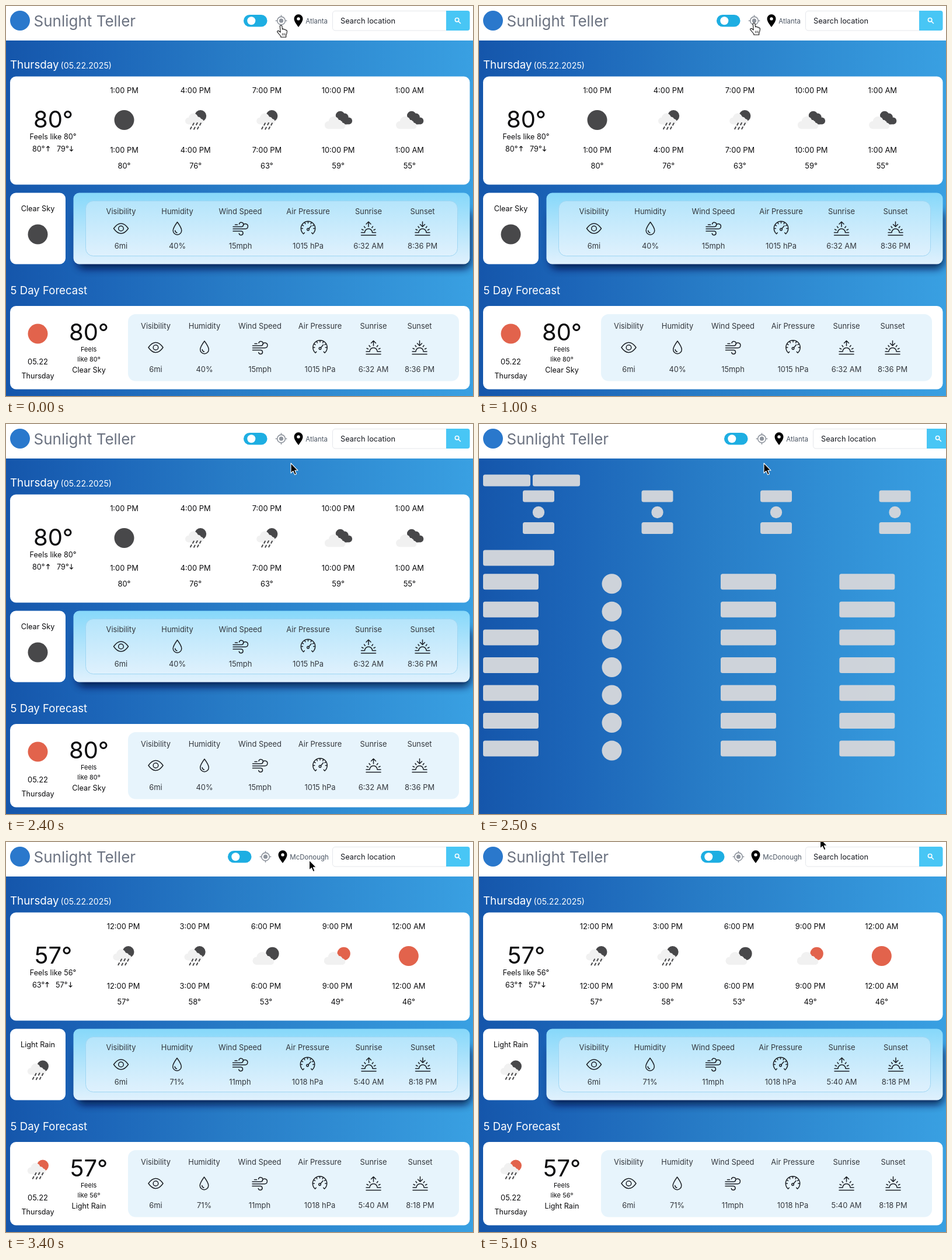
An HTML page that plays this animation: 800x667 px, repeating every 5200 ms.

```html
<!DOCTYPE html>
<html lang="en">
<head>
<meta charset="utf-8">
<title>Weather</title>
<style>
html, body { margin: 0; width: 100%; height: 100%; overflow: hidden; background: #fff; }
svg { display: block; width: 800px; height: 667px; font-family: Inter, Lato, sans-serif; }
</style>
</head>
<body>
<svg id="stage" viewBox="0 0 800 667" xmlns="http://www.w3.org/2000/svg"></svg>
<script>
const LOOP = 5200, STEP = 100, LOAD = 2500, READY = 3200, PULSE = 2400;
const DARK = '#48484a', SUN = '#e2634c', PALE = '#f1f1f1', INK = '#0b0b0d', SOFT = '#33373d';

const text = (x, y, s, size = 12.9, fill = INK, anchor = 'middle') =>
  `<text x="${x}" y="${y}" font-size="${size}" fill="${fill}" text-anchor="${anchor}">${s}</text>`;
const rect = (x, y, w, h, r, fill, more = '') =>
  `<rect x="${x}" y="${y}" width="${w}" height="${h}" rx="${r}" fill="${fill}" ${more}/>`;
const disc = (x, y, r, fill) => `<circle cx="${x}" cy="${y}" r="${r}" fill="${fill}"/>`;
const at = (x, y, body, more = '') => `<g transform="translate(${x} ${y})" ${more}>${body}</g>`;
const line = d => `<path d="${d}"/>`;

// Weather pictures, each centred on 0,0
const cloud = (x, y, s) => at(x, y,
  `<g transform="scale(${s})">` + disc(-11, 4, 6.5, PALE) + disc(-2, -1.5, 9, PALE) +
  disc(7, 2, 6, PALE) + disc(12, 5.2, 5.3, PALE) + rect(-12, 0, 24, 10.5, 2, PALE) + '</g>');
const drops = [[-4, 7], [2, 6.5], [8, 7], [-8, 13.5], [-2, 14], [4, 13.5]]
  .map(([x, y]) => `M${x + 1} ${y - 1.5}l-1.7 3.2`).join('');
const sky = {
  clear: c => disc(0, 0, 17, c),
  rain: c => disc(8.5, -7, 10, c) + cloud(-2, -2, .9) +
    `<path d="${drops}" stroke="${DARK}" stroke-width="2" stroke-linecap="round"/>`,
  few: c => disc(11, -4, 11.2, c) + cloud(-4.5, 4, 1.05),
  broken: c => disc(3.5, -7.5, 7.8, c) + disc(11, -5, 6.5, c) + disc(18, 1.5, 6, c) +
    rect(4, -4, 14, 11.5, 3, c) + cloud(-5.5, 4.5, 1.02)
};

// Line icons for the statistics
const sunHalf = 'M-12.5 11.5H12.5M-12.5 7H-6.5M6.5 7H12.5M-6.5 7A6.5 6.5 0 0 1 6.5 7' +
  'M-11.5 1.5l2.6 1.2M11.5 1.5l-2.6 1.2M-7.5 -3.5l1.7 2.3M7.5 -3.5l-1.7 2.3M0 -11.5V-3';
const ticks = [-150, -120, -90, -60, -30, 0, 180].map(a => {
  const c = Math.cos(a * Math.PI / 180), s = Math.sin(a * Math.PI / 180);
  return `M${c * 9.2} ${s * 9.2}L${c * 12} ${s * 12}`;
}).join('');
const icons = [
  line('M-12.5 0C-8 -6.5 -4 -8.5 0 -8.5S8 -6.5 12.5 0C8 6.5 4 8.5 0 8.5S-8 6.5 -12.5 0Z') +
    '<circle r="4.3"/>',
  line('M0 -11C4 -5.5 7.3 -.8 7.3 3.4A7.3 7.3 0 0 1 -7.3 3.4C-7.3 -.8 -4 -5.5 0 -11ZM-3.8 3.6A4 4 0 0 0 -.6 7.2'),
  line('M-12.5 -3H1.5A3.7 3.7 0 1 0 -2 -7.5M-12.5 .7H8.5A4.3 4.3 0 1 0 4.6 -5.2M-12.5 4.4H1A3.4 3.4 0 1 1 -2.2 8.6M-9 -6.6H-5'),
  line('M-8 9.2A12.2 12.2 0 1 1 8 9.2M-8 9.2l1.8 -2M8 9.2l-1.8 -2M1.2 .4L5.4 -4.6' + ticks) +
    '<circle cy="1.6" r="1.8"/>',
  line(sunHalf + 'M-4 -7.5L0 -11.5L4 -7.5'),
  line(sunHalf + 'M-4 -7L0 -3L4 -7')
];
const titles = ['Visibility', 'Humidity', 'Wind Speed', 'Air Pressure', 'Sunrise', 'Sunset'];

const stats = (xs, values, top, mid, low) => xs.map((x, i) =>
  text(x, top, titles[i], 12.9, SOFT) +
  at(x, mid, icons[i], 'fill="none" stroke="#1d2127" stroke-width="1.5" stroke-linecap="round" stroke-linejoin="round"') +
  text(x, low, values[i], 12.9, SOFT)).join('');

const arrow = (x, dir) => at(x, 244,
  `<path transform="scale(1 ${dir})" d="M0 4.5V-4M-2.8 -1.3L0 -4.2L2.8 -1.3" fill="none" stroke="${INK}" stroke-width="1.2"/>`);

const page = w => {
  const hours = w.hours.map(([x, hour, kind, color, temp]) =>
    text(x, 148.7, hour) + at(x, 195, sky[kind](color)) +
    text(x, 250.7, hour) + text(x, 277.7, temp + '°')).join('');
  return text(7, 107, 'Thursday', 18.8, '#fff', 'start') +
    text(93.5, 106.5, '(05.22.2025)', 14.2, '#fff', 'start') +
    rect(7, 120.5, 787.5, 185, 10, '#fff') +
    text(81, 207.5, w.temp, 40) +
    text(80.5, 228.2, 'Feels like ' + w.feels, 12.6) +
    text(45, 248.7, w.high, 12.7, INK, 'start') + arrow(w.ax, 1) +
    text(w.lx, 248.7, w.low, 12.7, INK, 'start') + arrow(w.ax + 40, -1) + hours +
    rect(122, 350, 674, 99, 12, '#02113f', 'opacity=".85" filter="url(#blur)"') +
    rect(7, 319.5, 95, 122, 10, '#fff') +
    text(54.5, 351.2, w.state, 12.7) + at(54.5, 390.5, sky[w.kind](DARK)) +
    rect(115.5, 319.5, 679, 122, 10, 'url(#panel)') +
    rect(136.5, 333.5, 637, 94, 13, 'url(#inner)', 'stroke="#9fd6f3" stroke-width="1"') +
    stats(w.upper, w.values, 355.5, 380.5, 415.2) +
    text(7.5, 492.5, '5 Day Forecast', 18.6, '#fff', 'start') +
    rect(7, 513, 787.5, 142.5, 10, '#fff') +
    at(54.5, 560.5, sky[w.kind](SUN)) +
    text(54.5, 612.7, '05.22') + text(54.5, 636.5, 'Thursday', 12.6) +
    text(142, 572, w.temp, 40) +
    text(141.7, 590.5, 'Feels', 11) + text(142, 607.5, 'like ' + w.feels, 11) +
    text(142, 626.5, w.state, 12.7) +
    rect(209, 527, 567, 114.5, 13, '#e7f4fc') +
    stats(w.lower, w.values, 552, 584, 625.7);
};

const hourRow = (x0, rows) => rows.map((r, i) => [x0 + i * 122.2, ...r]);
const before = {
  temp: '80°', feels: '80°', high: '80°', low: '79°', ax: 72, lx: 87, state: 'Clear Sky', kind: 'clear',
  hours: hourRow(202.5, [['1:00 PM', 'clear', DARK, 80], ['4:00 PM', 'rain', DARK, 76], ['7:00 PM', 'rain', DARK, 63],
    ['10:00 PM', 'broken', DARK, 59], ['1:00 AM', 'broken', DARK, 55]]),
  upper: [197, 293.5, 401.5, 517.5, 621, 713.5], lower: [256.5, 340, 435, 538, 629.5, 708.5],
  values: ['6mi', '40%', '15mph', '1015 hPa', '6:32 AM', '8:36 PM']
};
const after = {
  temp: '57°', feels: '56°', high: '63°', low: '57°', ax: 70.5, lx: 85, state: 'Light Rain', kind: 'rain',
  hours: hourRow(201, [['12:00 PM', 'rain', DARK, 57], ['3:00 PM', 'rain', DARK, 58], ['6:00 PM', 'few', DARK, 53],
    ['9:00 PM', 'few', SUN, 49], ['12:00 AM', 'clear', SUN, 46]]),
  upper: [197, 293, 401, 516.5, 621.5, 714], lower: [256.5, 339.5, 434.5, 537.5, 629.5, 709.5],
  values: ['6mi', '71%', '11mph', '1018 hPa', '5:40 AM', '8:18 PM']
};

const skeleton = () => {
  const g = '#d1d5db';
  let s = rect(7, 86.5, 81, 20, 3.5, g) + rect(92, 86.5, 81, 20, 3.5, g) + rect(7, 215.5, 122, 27, 3.5, g);
  for (let i = 0; i < 4; i++) {
    const x = 75 + i * 203.5;
    s += rect(x, 113.5, 54, 20, 3.5, g) + disc(x + 27, 151, 10.2, g) + rect(x, 168, 54, 20, 3.5, g);
  }
  for (let i = 0; i < 7; i++) {
    const y = 256.3 + i * 47.55;
    s += [7, 414, 617.3].map(x => rect(x, y, 95, 27, 3.5, g)).join('') + disc(227.5, y + 17, 17, g);
  }
  return s;
};

const stop = (o, c) => `<stop offset="${o}" stop-color="${c}"/>`;
const stage = document.getElementById('stage');
stage.innerHTML = `<defs>
<linearGradient id="bg">${stop(0, '#1556ab')}${stop(.2, '#1c65b8')}${stop(.5, '#287dc7')}${stop(1, '#39a0e2')}</linearGradient>
<linearGradient id="panel" x2="0" y2="1">${stop(0, '#86d8fa')}${stop(1, '#e0f1fd')}</linearGradient>
<linearGradient id="inner" x2="0" y2="1">${stop(0, '#b5e5fb')}${stop(1, '#dff1fd')}</linearGradient>
<filter id="blur" x="-10%" y="-40%" width="120%" height="180%"><feGaussianBlur stdDeviation="7"/></filter>
</defs>` +
  rect(0, 0, 800, 667, 0, '#fff') + rect(0, 59, 800, 608, 0, 'url(#bg)') +
  disc(24, 25, 17, '#2a78cc') +
  text(47.5, 35, 'Sunlight Teller', 26, '#6b7280', 'start') +
  '<g id="tools">' + rect(407, 15, 40.5, 20.4, 10.2, '#1eaee2') + disc(420.3, 25.2, 7, '#fff') +
  at(471.5, 25.2, '<circle r="6.8" fill="none"/>' + line('M0 -9.8V-6.8M0 6.8V9.8M-9.8 0H-6.8M6.8 0H9.8') +
    '<circle r="3.6" fill="#8f959e" stroke="none"/>', 'stroke="#8f959e" stroke-width="1.6"') +
  at(501, 22, '<path fill-rule="evenodd" d="M0 14C-4.5 8 -7.5 3.8 -7.5 -.3A7.5 7.5 0 0 1 7.5 -.3C7.5 3.8 4.5 8 0 14ZM0 -2.8A2.7 2.7 0 1 0 0 2.6A2.7 2.7 0 1 0 0 -2.8Z"/>') +
  '<text id="place" x="513.3" y="30" font-size="11.5" fill="#4b5563"></text></g><g id="search">' +
  '<path d="M754 8.5H564a4.5 4.5 0 0 0 -4.5 4.5V37.500a4.500 4.500 0 0 0 4.500 4.500H754" fill="#fff" stroke="#e5e7eb"/>' +
  '<path d="M754 8H790.500a4 4 0 0 1 4 4V38a4 4 0 0 1 -4 4H754Z" fill="#48c6f5"/>' +
  text(573, 30, 'Search location', 12.8, '#15181f', 'start') +
  at(772.6, 23.7, '<circle r="3.2"/>' + line('M2.5 2.500L6.300 6.300'), 'fill="none" stroke="#fff" stroke-width="1.6"') + '</g>' +
  `<g id="before">${page(before)}</g><g id="wait">${skeleton()}</g><g id="after">${page(after)}</g>` +
  '<g id="arrow"><path d="M0 0V17L3.9 13.400L6.700 19.800L9.500 18.500L6.800 12.300H12Z" fill="#000" stroke="#fff" stroke-width="1.1" stroke-linejoin="round"/></g>' +
  '<g id="hand"><path d="M-1.700 1.600C-1.700 -.5 1.500 -.5 1.800 1.600L2.500 7C3.200 5.700 5.200 6 5.400 7.500C6.300 6.500 8 7 8.200 8.500C9.300 7.900 10.500 8.700 10.400 10.200C10.400 14 9.700 15.500 8.700 17.300V20.300H-.2V18.600C-2.500 16.500 -4 13.900 -6 11.700C-7.200 10 -5 8.500 -3.200 10L-.8 12Z" fill="#fff" stroke="#111" stroke-width="1.1" stroke-linejoin="round"/><path d="M2.500 13.500v3.800M4.800 13.500v3.800M7 13.500v3.800" stroke="#111" stroke-width=".8"/></g>';

const el = {};
for (const id of ['tools', 'place', 'search', 'before', 'wait', 'after', 'arrow', 'hand'])
  el[id] = document.getElementById(id);

const ease = p => { p = Math.min(1, Math.max(0, p)); return p * p * (3 - 2 * p); };
// start, end, x, y of each pointer move
const moves = [[500, 900, 471, 29], [1400, 1800, 488, 67], [3050, 3400, 519.5, 31], [4200, 4700, 584.5, -6]];
const pointer = t => moves.reduce(([x, y], [a, b, X, Y]) => {
  const p = ease((t - a) / (b - a));
  return [x + (X - x) * p, y + (Y - y) * p];
}, [471, 33]);

const show = (node, on) => node.setAttribute('display', on ? 'inline' : 'none');
const move = (node, x, y = 0) => node.setAttribute('transform', `translate(${x} ${y})`);

function draw(t) {
  const done = t >= READY, loading = t >= LOAD && !done;
  show(el.before, t < LOAD);
  show(el.wait, loading);
  show(el.after, done);
  el.wait.setAttribute('opacity', 1 - .5 * ease((t - PULSE) / 1000));
  move(el.tools, loading ? 13 : done ? -27 : 0);
  move(el.search, loading ? 13 : 0);
  el.place.textContent = done ? 'McDonough' : 'Atlanta';
  const [x, y] = pointer(t), hover = t < 2000 && y < 40;
  show(el.hand, hover);
  show(el.arrow, !hover);
  move(hover ? el.hand : el.arrow, x, y);
}

const start = performance.now();
function tick() {
  const t = (performance.now() - start) % LOOP;
  draw(Math.floor(t / STEP) * STEP);
  requestAnimationFrame(tick);
}
draw(0);
requestAnimationFrame(tick);
</script>
</body>
</html>
```
